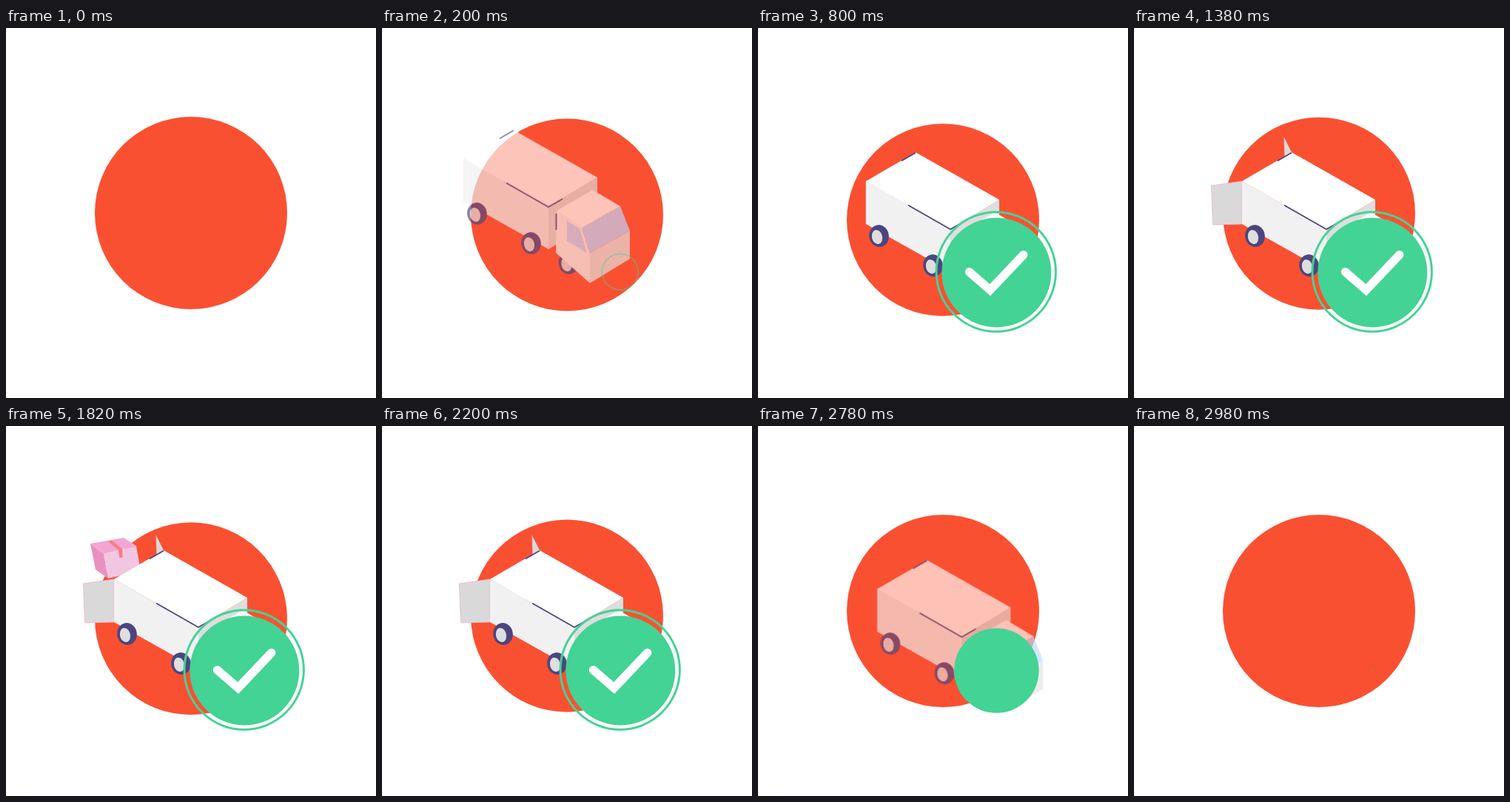
An HTML page for the animation above (3 s loop, 500 px wide and 500 px high).

```html
<!DOCTYPE html>
<html lang="en">
<head>
<meta charset="utf-8">
<title>Delivery van</title>
<style>
  html, body { margin: 0; width: 100%; height: 100%; overflow: hidden; background: #fff; }
  svg { display: block; width: 100vw; height: 100vh; }
</style>
</head>
<body>
<svg viewBox="0 0 500 500">
  <defs>
    <g id="wheel">
      <ellipse rx="13.3" ry="15" fill="#4c4680" transform="rotate(-8)"/>
      <ellipse cx="-2.8" cy=".8" rx="7" ry="9.7" fill="#dedede" transform="rotate(-14)"/>
    </g>
  </defs>

  <circle id="sun" cx="250" cy="250" r="130" fill="#fa5032"/>

  <g id="van">
    <polygon id="doorRight" fill="#dadada"/>
    <g id="parcel">
      <polygon points="114,159 159,151 176,162 132,173" fill="#f3a6d1"/>
      <polygon points="114,159 132,173 138,206 121,194" fill="#ea90c1"/>
      <polygon points="132,173 176,162 182,196 138,206" fill="#f2c5e1"/>
      <path d="M138,156L143,154.500L157,166L157.500,177.500L153.500,178.500L152,167.500Z" fill="#fb7a86"/>
    </g>
    <polygon id="doorLeft" fill="#d9d9d9" stroke="#efb3d3" stroke-width=".8"/>

    <use href="#wheel" x="287" y="348"/>
    <polygon points="146,207 260,272 260,329 146,265" fill="#f1f1f1"/>
    <polygon points="260,272 326,232 326,290 260,329" fill="#dedede"/>
    <polygon points="146,207 213,168 326,232 260,272" fill="#fff"/>
    <g fill="none" stroke="#4c4680" stroke-width="1.8">
      <path d="M194,179.500L213,168.500"/>
      <path d="M203,239.500L260,272L279,261"/>
    </g>

    <polygon points="271,277 305,300 316,334 316,375 270,334" fill="#f6f6f6"/>
    <polygon points="285,291 302,301 312,334 285,318" fill="#c5dbff"/>
    <polygon points="316,334 370,304 370,342 316,375" fill="#e4e4e4"/>
    <polygon points="305,300 357,271 370,304 316,334" fill="#bfd8ff"/>
    <polygon points="271,277 320,249 357,271 305,300" fill="#fff"/>
    <path d="M270.500,281V303" stroke="#4c4680" stroke-width="1.800"/>

    <use href="#wheel" x="163.500" y="281"/>
    <use href="#wheel" x="236.500" y="321"/>
  </g>

  <g id="ring"><circle r="80.700" fill="none" stroke="#43d394" stroke-width="3"/></g>
  <circle id="disc" cx="322.300" cy="330.500" fill="#43d394"/>
  <path id="check" d="M285.500,329.700L313.700,354L358.700,306.500" pathLength="100" fill="none"
        stroke="#fff" stroke-width="11.500" stroke-linecap="round"/>
</svg>

<script>
const LOOP = 3000;
const el = id => document.getElementById(id);
const [sun, van, doorRight, parcel, doorLeft, ring, disc, check] =
  ['sun', 'van', 'doorRight', 'parcel', 'doorLeft', 'ring', 'disc', 'check'].map(el);

const clamp = x => Math.min(1, Math.max(0, x));
const linear = (t, from, to) => clamp((t - from) / (to - from));
const ease = (t, from, to) => (1 - Math.cos(Math.PI * linear(t, from, to))) / 2;
const pulse = (t, a, b, c, d) => ease(t, a, b) - ease(t, c, d);
const mix = (a, b, k) => a + (b - a) * k;
const mixPoint = (p, q, k) => p.map((v, i) => mix(v, q[i], k));

// A door panel hangs from a vertical hinge; its free edge slides from shut to open.
function setDoor(node, hinge, shut, open, k) {
  const [x, y] = mixPoint(shut, open, k);
  const drop = mix(58, 53, k);
  node.setAttribute('points', [
    hinge, [x, y], [x + 2 * k, y + drop], [hinge[0], hinge[1] + 58]
  ].join(' '));
}

function draw(t) {
  const bob = 5.5 * (1 - Math.cos(Math.PI * Math.min(t, 2560) / 640));
  sun.setAttribute('cy', 250 + bob);

  const drive = 46 * (ease(t, 0, 620) - 1 + ease(t, 2640, 3000));
  van.setAttribute('transform', `translate(${drive} ${drive * 0.86})`);
  van.setAttribute('opacity', linear(t, 0, 300) - linear(t, 2700, 2930));

  const doors = pulse(t, 840, 1160, 2320, 2680);
  setDoor(doorLeft, [146, 207], [181, 196], [104.5, 213], doors);
  setDoor(doorRight, [213, 168], [183, 190], [202.5, 147], doors);

  const lift = pulse(t, 1460, 1800, 1960, 2300);
  parcel.setAttribute('visibility', lift > 0 ? 'visible' : 'hidden');
  parcel.setAttribute('transform',
    `translate(${mix(188, 147, lift)} ${mix(228, 179, lift)}) ` +
    `rotate(${mix(12, 0, lift)}) scale(${mix(0.6, 1, lift)}) translate(-147 -179)`);

  const ringScale = pulse(t, 60, 440, 2560, 2940);
  ring.setAttribute('transform', `translate(321.700 329.500) scale(${ringScale})`);
  ring.setAttribute('visibility', ringScale > 0 ? 'visible' : 'hidden');
  disc.setAttribute('r', 74 * pulse(t, 280, 560, 2680, 3000));

  const tick = 100 * pulse(t, 500, 780, 2340, 2620);
  check.setAttribute('visibility', tick > 0.01 ? 'visible' : 'hidden');
  check.setAttribute('stroke-dasharray', `${tick} 200`);
}

const start = performance.now();
function frame() {
  draw((performance.now() - start) % LOOP);
  requestAnimationFrame(frame);
}
draw(0);
requestAnimationFrame(frame);
</script>
</body>
</html>
```
